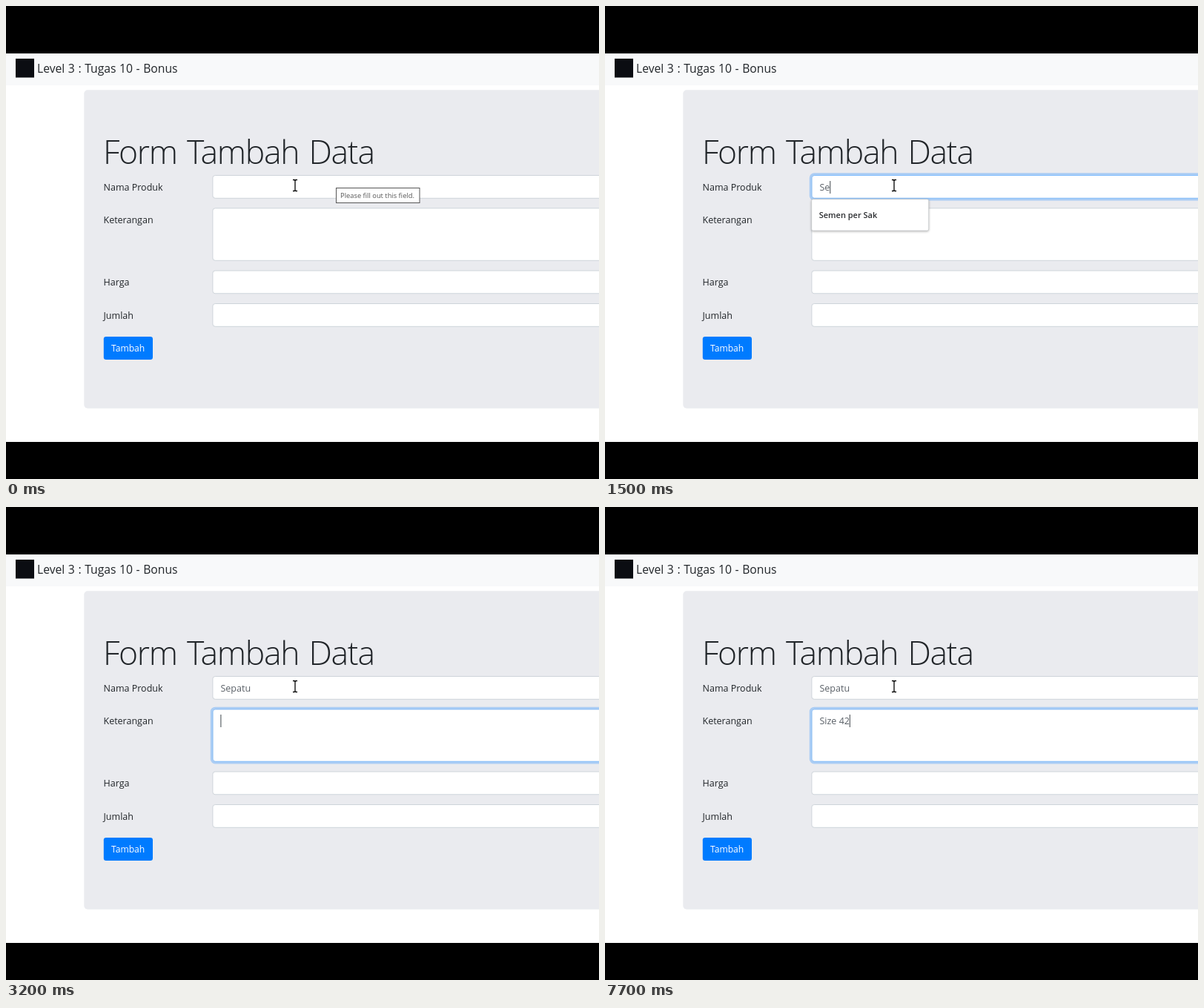
An HTML page that plays this animation: 800 by 638 pixels, repeating every 8 s.

```html
<!DOCTYPE html>
<html lang="id">
<head>
<meta charset="utf-8">
<title>Form Tambah Data</title>
<style>
  html, body { margin: 0; width: 100%; height: 100%; overflow: hidden; background: #000; }
  svg { display: block; }
  text { font: 12.5px "Open Sans", "Noto Sans", sans-serif; fill: #212529; white-space: pre; }
  .brand { font-size: 15.7px; word-spacing: .5px; }
  .title { font-size: 44.5px; font-weight: 300; letter-spacing: -1.3px; word-spacing: 3px; }
  .button { font-size: 12.1px; fill: #fff; }
  .tip { font-size: 9.35px; fill: #575757; }
  .value { fill: #5a6067; }
  .field { fill: #fff; stroke: #ced4da; }
  .edge { fill: none; stroke: #80bdff; }
  .glow { fill: none; stroke: #007bff; stroke-opacity: .27; stroke-width: 2.7; }
  #menu rect { fill: #fff; stroke: #c6c8cb; stroke-width: .8; filter: drop-shadow(0 1.5px 1.5px rgba(0, 0, 0, .28)); }
  #menu text { font-size: 11px; font-weight: 600; fill: #2b2d30; }
</style>
</head>
<body>
<svg width="800" height="638" viewBox="0 0 800 638">
  <rect y="64" width="800" height="524" fill="#fff"/>
  <rect y="64" width="800" height="43" fill="#f8f9fa"/>
  <rect x="13" y="71" width="25" height="25.5" fill="#0b0d12"/>
  <text class="brand" x="42" y="90">Level 3 : Tugas 10 - Bonus</text>

  <rect x="105.3" y="113.3" width="720" height="429.5" rx="5" fill="#eaebef"/>
  <text class="title" x="131" y="212.5">Form Tambah Data</text>
  <text x="131.5" y="248.5">Nama Produk</text>
  <text x="131.5" y="293">Keterangan</text>
  <text x="131.5" y="377.3">Harga</text>
  <text x="131.5" y="421.7">Jumlah</text>
  <g id="fields"></g>
  <rect x="131.8" y="446" width="66.2" height="31" rx="3.3" fill="#007bff"/>
  <text class="button" x="142" y="466">Tambah</text>

  <text class="value" id="name" x="289.5" y="249.3"></text>
  <text class="value" id="note" x="289.5" y="293.3"></text>
  <rect id="caret" width="1" height="17" fill="#40464c"/>
  <g id="menu"></g>

  <g id="tip">
    <rect x="445.5" y="245.5" width="112.5" height="20" fill="#fff" stroke="#575757"/>
    <text class="tip" x="451" y="259.2">Please fill out this field.</text>
  </g>

  <circle id="ring" cx="390" cy="241" fill="#f0506e" fill-opacity=".06" stroke="#e8405f" stroke-width="1.1" stroke-dasharray="1.6 .8"/>
  <path d="M387 234.5h2l1 1 1-1h2M390 235.5v13M387 249.5h2l1-1 1 1h2" fill="none" stroke="#000" stroke-width="1.3"/>
</svg>
<script>
const LOOP = 8000;
const $ = id => document.getElementById(id);
const clamp = v => Math.max(0, Math.min(1, v));
const ease = v => { v = clamp(v); return v * v * (3 - 2 * v); };

// Steps are [time, value]; the latest one reached holds.
const at = (steps, t) => steps.reduce((held, [start, v]) => t >= start ? v : held, steps[0][1]);

const people = ['darsono', 'qw', 'Surtija Pradila', 'Darsono Winardi', 'FELIANA SUDIARTI', 'Edo'];
const product = 'Semen per Sak';
const menus = [[0, []], [800, people], [1300, [people[2], product]], [1500, [product]], [2000, []]];

const typing = (word, times) => [[0, ''], ...times.map((time, i) => [time, word.slice(0, i + 1)])];
const nameKeys = typing('Sepatu', [1300, 1500, 2000, 2100, 2300, 2500]);
const noteKeys = typing('Size 42', [4600, 5000, 5200, 5400, 5600, 7500, 7700]);
const caretOn = [[0, 0], [300, 1], [800, 0], [1300, 1], [3600, 0], [4100, 1], [6200, 0], [6700, 1], [7200, 0], [7500, 1]];
const FOCUS = 200, CLICK = 700, TAB = 2900;

const box = (cls, y, h, grow = 0) =>
  `<rect class="${cls}" x="${278.9 - grow}" y="${y - grow}" width="560" height="${h + 2 * grow}" rx="${3.3 + grow}"/>`;
const focusBox = (id, y, h) => `<g id="${id}">${box('glow', y, h, 1.8)}${box('edge', y, h)}</g>`;
$('fields').innerHTML =
  [[228.5, 30.8], [272.8, 70.5], [357, 30.8], [401.5, 30.8]].map(([y, h]) => box('field', y, h)).join('') +
  focusBox('nameFocus', 228.5, 30.8) + focusBox('noteFocus', 272.8, 70.5);

let shown;
function drawMenu(items) {
  if (items === shown) return;
  shown = items;
  const height = 43 + (items.length - 1) * 29.7;
  $('menu').innerHTML = items.length
    ? `<rect x="278.7" y="260.7" width="158" height="${height - .7}" rx="2"/>` +
      items.map((s, i) => `<text x="288.7" y="${285.8 + i * 29.7}">${s}</text>`).join('')
    : '';
}

function drawRing(t) {
  const age = t - (t < CLICK ? FOCUS : CLICK);
  const visible = age >= 0 && age < 500;
  $('ring').setAttribute('r', 4 + 9.2 * ease(age / 250));
  $('ring').style.opacity = visible ? .85 * clamp((500 - age) / 180) : 0;
}

function draw(t) {
  const inNote = t >= TAB;
  const moved = ease((t - TAB) / 150);
  $('name').textContent = at(nameKeys, t);
  $('note').textContent = at(noteKeys, t);
  $('tip').style.opacity = t < FOCUS ? 1 : 0;
  $('nameFocus').style.opacity = ease((t - FOCUS) / 150) * (1 - moved);
  $('noteFocus').style.opacity = moved;
  drawMenu(at(menus, t));
  drawRing(t);

  const text = $(inNote ? 'note' : 'name');
  const width = text.textContent ? text.getComputedTextLength() : 0;
  $('caret').setAttribute('x', 289.4 + width);
  $('caret').setAttribute('y', inNote ? 280 : 236);
  $('caret').style.opacity = at(caretOn, t);
}

function tick() {
  draw(performance.now() % LOOP);
  requestAnimationFrame(tick);
}
tick();
</script>
</body>
</html>
```
